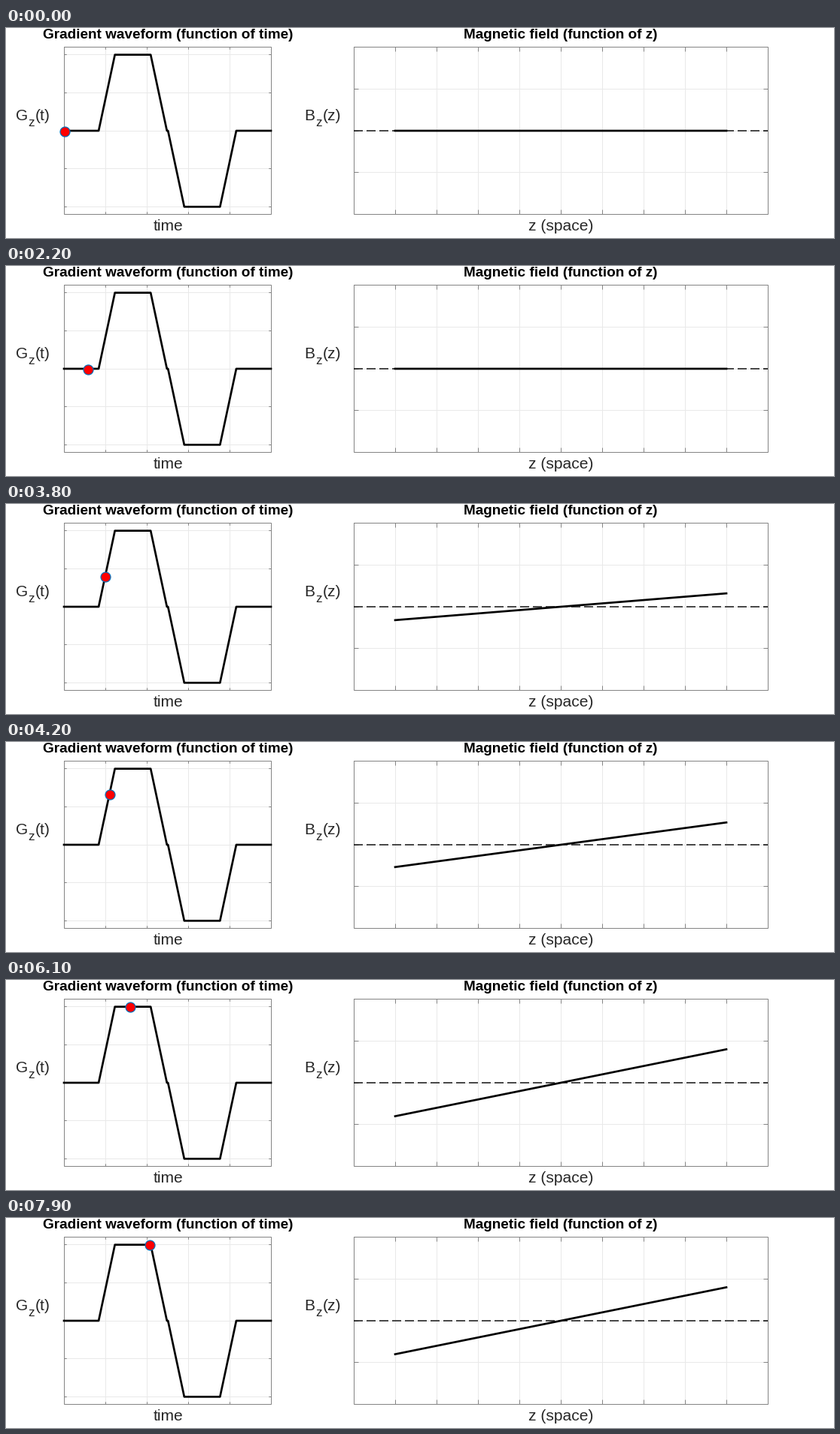
Animation, 1100 px wide and 280 px high, one loop 8000 ms. Source, as a matplotlib script:

```python
import matplotlib.pyplot as plt
import numpy as np
from matplotlib.animation import FuncAnimation

W, H, DPI = 1100, 280, 100
PT = 72 / DPI  # points per pixel
TOP, BOTTOM, MID = 25.5, 248.5, 137.0
HALF = (BOTTOM - TOP) / 2
LEFT = (77.5, 352.5)
RIGHT = (462.5, 1012.5)
INK, BOX, GRID = "#262626", "#848484", "#e9e9e9"

plt.rcParams["font.family"] = "Liberation Sans"
fig = plt.figure(figsize=(W / DPI, H / DPI), dpi=DPI, facecolor="white")
ax = fig.add_axes([0, 0, 1, 1])
ax.set_xlim(0, W)
ax.set_ylim(H, 0)
ax.axis("off")


def line(x, y, color, width, **kw):
    return ax.plot(x, y, color=color, lw=width * PT, snap=False, **kw)[0]


def text(x, y, s, size, color=INK, **kw):
    ax.text(x, y, s, fontsize=size * PT, color=color, va="baseline", **kw)


def pixel(v):
    return np.floor(v) + 0.5


def panel(span, xs, ys, tick):
    x0, x1 = span
    for x in xs:
        line([x, x], [TOP, BOTTOM], GRID, 1, zorder=1)
    for y in ys:
        line([x0, x1], [y, y], GRID, 1, zorder=1)
    for x in xs:
        line([x, x], [TOP, TOP + tick], BOX, 1, zorder=2)
        line([x, x], [BOTTOM - tick, BOTTOM], BOX, 1, zorder=2)
    for y in ys:
        line([x0, x0 + tick], [y, y], BOX, 1, zorder=2)
        line([x1 - tick, x1], [y, y], BOX, 1, zorder=2)
    line([x0, x1, x1, x0, x0], [TOP, TOP, BOTTOM, BOTTOM, TOP], BOX, 1,
         zorder=2, solid_joinstyle="miter")


def label(x, name, arg, sub_x, arg_x):
    text(x, 123, name, 21)
    text(sub_x, 131, "z", 17)
    text(arg_x, 123, f"({arg})", 21)


# Gradient waveform: two opposite trapezoids, 192 samples numbered from 0
LAST = 191
KNOTS = [0, 32, 47, 80, 95, 96, 111, 144, 159, LAST]
LEVELS = [0, 0, 1, 1, 0, 0, -1, -1, 0, 0]
AMP = HALF / 1.1
TILT = 0.4 * HALF


def gradient(k):
    return np.interp(k, KNOTS, LEVELS)


def time_x(k):
    return 77 + 275 * np.asarray(k) / LAST


panel(LEFT, LEFT[0] + 55 * np.arange(1, 5),
      pixel(MID + AMP * np.linspace(-1, 1, 5)), 2.75)
panel(RIGHT, RIGHT[0] + 55 * np.arange(1, 10),
      pixel(MID + HALF * np.array([-0.5, 0, 0.5])), 5.5)

text(215, 14, "Gradient waveform (function of time)", 19, "black",
     weight="bold", ha="center")
text(737, 14, "Magnetic field (function of z)", 19, "black",
     weight="bold", ha="center")
text(215, 270, "time", 21, ha="center")
text(737, 270, "z (space)", 21, ha="center")
label(12.6, "G", "t", 29.5, 38.6)
label(396.6, "B", "z", 411.5, 420.6)

line(time_x(KNOTS), MID - AMP * np.array(LEVELS), "black", 2.7, zorder=4,
     solid_capstyle="projecting", solid_joinstyle="round")
line([462, 1012], [MID, MID], "black", 1.4, zorder=3,
     dashes=(12 / 1.4, 5 / 1.4), dash_capstyle="butt")
field = line([517, 957], [MID, MID], "black", 2.7, zorder=4,
             solid_capstyle="projecting")
dot = line([], [], "red", 0, zorder=5, marker="o", ms=13 * PT,
           mfc="red", mec="#0072bd", mew=1.2 * PT)


def update(k):
    g = gradient(k)
    dot.set_data([pixel(time_x(k))], [pixel(MID - AMP * g)])
    field.set_ydata([MID + TILT * g, MID - TILT * g])
    return dot, field


anim = FuncAnimation(fig, update, frames=80, interval=100, repeat=True,
                     repeat_delay=0, init_func=lambda: update(0))
plt.show()
```
